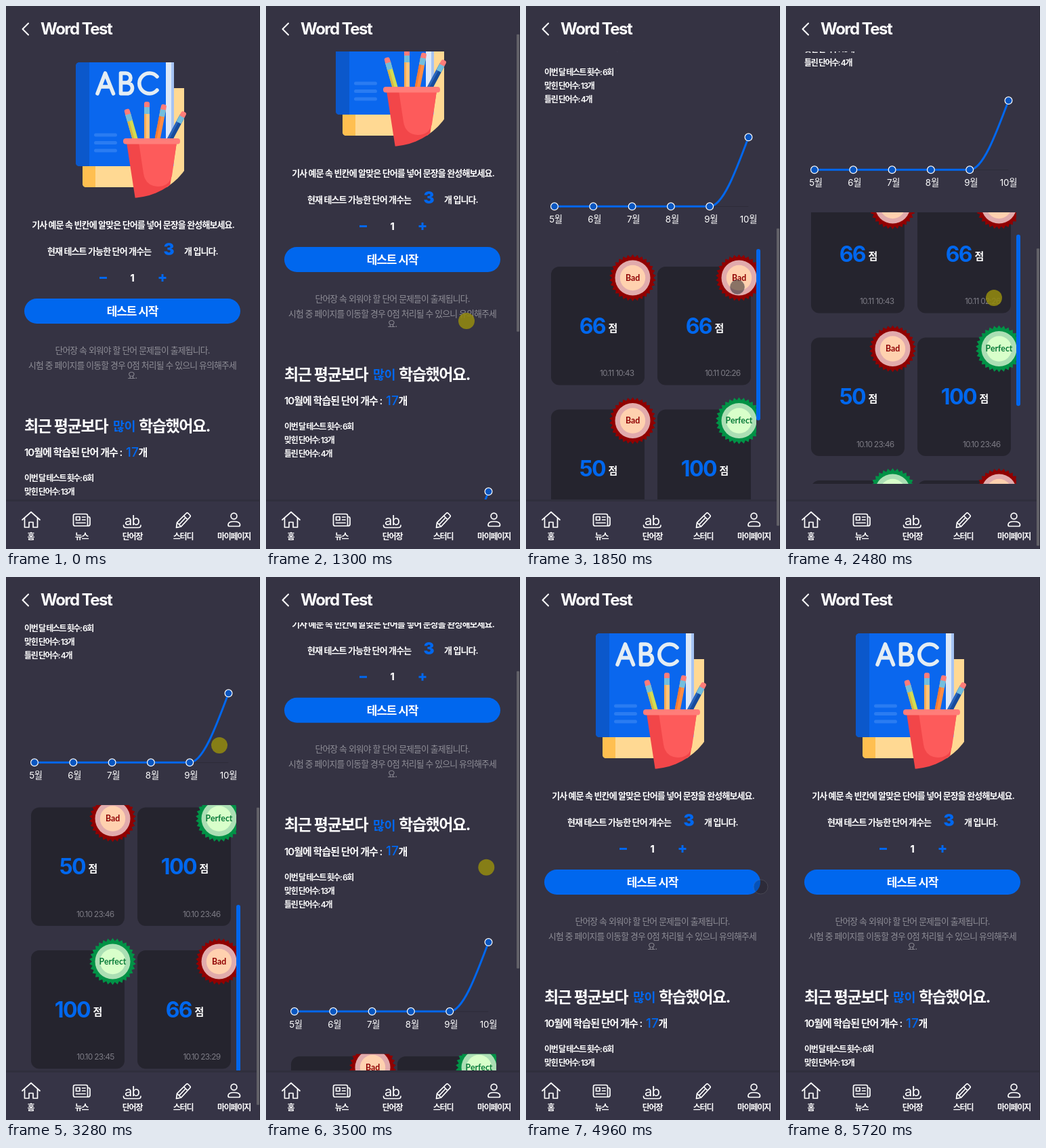
Animation of 375 by 800 pixels, one loop 6050 ms. Source, as an HTML page:

```html
<!DOCTYPE html>
<html lang="ko">
<head>
<meta charset="utf-8">
<style>
  html, body { margin: 0; width: 100%; height: 100%; overflow: hidden; background: #353343; }
  svg { display: block; width: 375px; height: 800px; font-family: Inter, "Noto Sans CJK KR", "Noto Sans CJK", sans-serif; }
</style>
</head>
<body>
<script>
const LOOP = 6050;
const BG = '#353343', BLUE = '#0067ee', GRAY = '#8f8e97';

// --- drawing helpers ---
const rect = (x, y, w, h, fill, rx = 0, extra = '') =>
  `<rect x="${x}" y="${y}" width="${w}" height="${h}" rx="${rx}" fill="${fill}" ${extra}/>`;
const circle = (x, y, r, fill, extra = '') =>
  `<circle cx="${x}" cy="${y}" r="${r}" fill="${fill}" ${extra}/>`;
const path = (d, fill) => `<path d="${d}" fill="${fill}"/>`;
const line = (d, stroke, width) =>
  `<path d="${d}" fill="none" stroke="${stroke}" stroke-width="${width}" stroke-linecap="round" stroke-linejoin="round"/>`;
// y is the middle of the glyphs
const text = (x, y, size, str, spacing = 0, { fill = '#fff', weight = 600, anchor = 'start', font = '' } = {}) =>
  `<text x="${x}" y="${y + size * .37}" font-size="${size}" font-weight="${weight}" fill="${fill}"
    text-anchor="${anchor}" letter-spacing="${spacing}" ${font && `font-family="${font}"`}>${str}</text>`;
const middle = { anchor: 'middle' };

// --- page parts ---
function pencil(x, y, angle, color, shade) {
  return `<g transform="translate(${x} ${y}) rotate(${angle})">
    ${rect(-4, 6, 8, 54, color)}${rect(-4, 6, 3, 54, shade)}
    ${rect(-4, 0, 8, 12, '#ff7d79', 3)}${rect(-4, 8, 8, 10, '#72bedd')}</g>`;
}

function illustration() {
  return `<g clip-path="url(#imageClip)">
    ${path('M119 121H263V267H119Q113 267 113 261V127Q113 121 119 121Z', '#ffd993')}
    ${path('M119 121H132V267H119Q113 267 113 261V127Q113 121 119 121Z', '#ffbf50')}
    ${rect(230, 83, 18, 153, '#dce8f8', 1)}${rect(244, 83, 4, 153, '#a5c3f3')}
    ${path('M109 83H236V236H109Q103 236 103 230V89Q103 83 109 83Z', '#0a67ee')}
    ${path('M109 83H123V236H109Q103 236 103 230V89Q103 83 109 83Z', '#0b58cb')}
    ${line('M135 129L146.500 99L158.500 129M139 119H154.500M169.500 99V129H178.500A8 8 0 0 0 178.500 113H169.500H177A7 7 0 0 0 177 99ZM223 104A15 15 0 1 0 223 124', '#e4edf3', 5.6)}
    ${line('M132.500 190H161.500M132.500 201.500H161.500M132.500 213H161.500', '#2a7cf2', 5)}
    ${pencil(178, 152, -16, '#d3dc52', '#d8b544')}
    ${pencil(208, 141, 0, '#ffc57c', '#f5ad58')}
    ${pencil(233.5, 145, 11, '#ff8d45', '#f47a35')}
    ${pencil(263.5, 156, 28, '#174c9c', '#2a66bd')}
    ${path('M178 201H252L239 285H191Z', '#f24649')}
    ${path('M196 201H252L245 250Q241 266 224 266Q206 265 203 247Z', '#fd5b5b')}
    ${rect(173, 195, 84, 8.5, '#ff7d79', 4)}
  </g>`;
}

function intro() {
  const muted = { fill: GRAY, weight: 400, anchor: 'middle' };
  return text(187.5, 322, 13, '기사 예문 속 빈칸에 알맞은 단어를 넣어 문장을 완성해보세요.', -.9, middle)
    + text(61, 361, 13, '현재 테스트 가능한 단어 개수는', -.9)
    + text(240.5, 358, 24, '3', 0, { fill: BLUE, weight: 900, anchor: 'middle' })
    + text(263, 361, 13, '개 입니다.', -.9)
    + path('M138 399h11v3h-11zM225.500 399h11v3h-11zM229.500 395h3v11h-3z', BLUE)
    + text(186.5, 400.5, 14, '1', 0, { weight: 800, anchor: 'middle' })
    + rect(27, 431, 319, 37, BLUE, 18.5)
    + text(186.5, 450, 17, '테스트 시작', -1.15, { weight: 700, anchor: 'middle' })
    + text(186.5, 507, 12.8, '단어장 속 외워야 할 단어 문제들이 출제됩니다.', -.8, muted)
    + text(186.5, 529, 12.8, '시험 중 페이지를 이동할 경우 0점 처리될 수 있으니 유의해주세', -.8, muted)
    + text(186.5, 544, 12.8, '요.', -.8, muted);
}

function summary() {
  return text(27, 618, 23, '최근 평균보다', -1.3, { weight: 700 })
    + text(158, 619, 18.5, '많이', -.5, { fill: BLUE })
    + text(196, 618, 23, '학습했어요.', -1.4, { weight: 700 })
    + text(27, 657.5, 15, '10월에 학습된 단어 개수 :', -1)
    + text(177, 656.5, 19, '17', 0, { fill: BLUE, weight: 500 })
    + text(195.5, 657.5, 15, '개')
    + ['이번 달 테스트 횟수: 6회', '맞힌 단어수: 13개', '틀린 단어수: 4개']
      .map((s, i) => text(27, 695.5 + i * 20, 12, s, -1.4)).join('');
}

function chart() {
  const xs = [0, 1, 2, 3, 4, 5].map(i => 42 + i * 57.3);
  return line('M42 893.500H328', '#2d2c39', 1)
    + line('M42 893.300H271.200C290.300 893.300 309.400 842.500 328.500 791.300', BLUE, 3)
    + xs.map((x, i) => circle(x, i < 5 ? 893.3 : 791.3, 5.4, '#0856c0', 'stroke="#fff" stroke-width="1.2"')
      + text(i < 5 ? x + 2 : x, 912, 13.3, `${i + 5}월`, -.2, { weight: 400, anchor: 'middle' })).join('');
}

function badge(x, y, perfect) {
  const [dark, ring, core] = perfect ? ['#009246', '#abdfb4', '#d8ffca'] : ['#900000', '#e1abac', '#ffd1af'];
  const teeth = Array.from({ length: 60 }, (_, i) => {
    const a = i * Math.PI / 30, r = i % 2 ? 30.5 : 34.5;
    return `${(x + r * Math.sin(a)).toFixed(1)},${(y - r * Math.cos(a)).toFixed(1)}`;
  });
  return `<polygon points="${teeth.join(' ')}" fill="${dark}"/>`
    + circle(x, y, 26, ring) + circle(x, y, 18.7, core)
    + text(x, y - .5, 12.3, perfect ? 'Perfect' : 'Bad', 0,
      { fill: perfect ? '#087a38' : dark, weight: 700, anchor: 'middle', font: 'Lato, sans-serif' });
}

function card(score, date, i) {
  const x = i % 2 ? 194 : 37, y = 982 + Math.floor(i / 2) * 210.5;
  const label = `<tspan fill="${BLUE}" font-size="32" font-weight="700" letter-spacing="-1.6">${score}</tspan>`
    + `<tspan dx="4.5" dy="-3" font-size="15">점</tspan>`;
  return rect(x, y, 138, 174.5, '#25242e', 12)
    + text(x + 70, y + 87, 32, label, 0, middle)
    + text(x + 122.5, y + 157, 12, date, -.75, { fill: '#7c7b84', weight: 400, anchor: 'end' })
    + badge(x + 120.5, y + 16.5, score === 100);
}

function records() {
  const items = [[66, '10.11 10:43'], [66, '10.11 02:26'], [50, '10.10 23:46'],
    [100, '10.10 23:46'], [100, '10.10 23:45'], [66, '10.10 23:29']];
  return `<g clip-path="url(#listClip)"><g id="list">${items.map(([s, d], i) => card(s, d, i)).join('')}</g></g>`
    + rect(340, 956, 6, 252.5, BLUE, 3, 'id="listThumb"');
}

function header() {
  return rect(0, 0, 375, 67, BG) + line('M33 25.500L24.500 34L33 42.500', '#fff', 2)
    + text(51, 33.3, 24, 'Word Test', -1.55, { weight: 700 });
}

function nav() {
  const icons = 'M24 757L37 745.500L50 757M27.500 754.500V768H34V760.500H40V768H46.500V754.500'
    + 'M102 748.500H118Q120.500 748.500 120.500 751V766H102Q99.500 766 99.500 763.500V751Q99.500 748.500 102 748.500Z'
    + 'M120.500 752.500H121.500Q124 752.500 124 755V763.500Q124 766 121 766M103.500 752.500H109V757.500H103.500ZM112.500 753H117M112.500 757H117M103.500 761.500H117'
    + 'M173.500 765Q173.500 768.500 177 768.500H195.500Q199 768.500 199 765'
    + 'M251.500 768.500L252.500 761L266 747.500Q267.500 746 269 747.500L271.500 750Q273 751.500 271.500 753L258.500 767ZM262.500 751L268 756.500M252.500 761L258.500 767M256 763.500L265 754'
    + 'M328 764.500C328 760.500 332 759.500 336.500 759.500S345.500 760.500 345.500 764.500Q345.500 766.500 343.500 766.500H330Q328 766.500 328 764.500Z';
  return rect(0, 727, 375, 3, '#302f3d') + rect(0, 730, 375, 70, '#363446')
    + line(icons, '#fff', 1.7)
    + circle(336.5, 751.5, 4.4, 'none', 'stroke="#fff" stroke-width="1.7"')
    + text(186.2, 757.5, 20, 'ab', -.5, { weight: 400, anchor: 'middle' })
    + ['홈', '뉴스', '단어장', '스터디', '마이페이지']
      .map((s, i) => text(36.5 + i * 75, 781.5, 12, s, -1.25, middle)).join('');
}

document.body.innerHTML = `<svg viewBox="0 0 375 800">
  <clipPath id="imageClip"><path d="M80 70H283V183A100 100 0 0 1 183 283H80Z"/></clipPath>
  <clipPath id="listClip"><rect x="0" y="956" width="340" height="400"/></clipPath>
  ${rect(0, 0, 375, 800, BG)}
  <g id="page">${illustration()}${intro()}${summary()}${chart()}${records()}</g>
  ${header()}${nav()}
  ${rect(374, 0, 1, 800, '#2b2a37')}
  ${rect(370, 0, 4, 438, '#626168', 1, 'id="pageThumb"')}
  ${circle(0, 0, 11, 'none', 'id="pointer"')}
</svg>`;

// --- motion: [time, value...] ---
const bursts = [[680, 1230, 8], [1300, 1850, 9], [1920, 2480, 9], [2540, 3080, 8], [3280, 3780, 8]];
const pageKeys = [[1160, 0], [1230, 18], [1300, 76], [1370, 165], [1440, 270], [1580, 450], [1710, 545],
  [1850, 598], [2000, 632], [2200, 652], [3080, 652], [3280, 620], [3350, 520], [3420, 390],
  [3490, 260], [3560, 150], [3640, 70], [3710, 22], [3780, 0]];
const listKeys = [[2340, 0], [2480, 52], [2620, 150], [2760, 210], [2900, 233]];
const pointerKeys = [[680, 366, 600], [1160, 298, 540], [1230, 297, 522], [1300, 296, 464], [1440, 300, 300],
  [1580, 304, 240], [1850, 312, 414], [2200, 308, 490], [2340, 307, 482], [2480, 307, 430], [2620, 306, 300],
  [2760, 308, 165], [2830, 308, 151], [3080, 313, 212], [3280, 315, 248], [3420, 320, 380],
  [3560, 330, 470], [3780, 346.5, 456.5]];
const presses = [[1160, 1560], [2340, 2700], [3210, 3500]];

// The screen refreshes in short bursts of even steps
function snap(t) {
  let held = 0;
  for (const [start, end, count] of bursts) {
    if (t < start) break;
    const step = (end - start) / (count - 1);
    held = start + step * Math.min(count - 1, Math.floor((t - start) / step + .01));
  }
  return held;
}

function sample(keys, t) {
  const i = keys.findIndex(k => k[0] > t);
  if (i < 0) return keys[keys.length - 1].slice(1);
  if (i === 0) return keys[0].slice(1);
  const a = keys[i - 1], b = keys[i], f = (t - a[0]) / (b[0] - a[0]);
  return a.slice(1).map((v, j) => v + (b[j + 1] - v) * f);
}

const set = (id, attrs) => {
  for (const name in attrs) document.getElementById(id).setAttribute(name, attrs[name]);
};

function draw(t) {
  const held = snap(t);
  const [scroll] = sample(pageKeys, held), [listScroll] = sample(listKeys, held);
  const [x, y] = sample(pointerKeys, held);
  const pressed = presses.some(([a, b]) => held >= a && held < b);

  set('page', { transform: `translate(0 ${-scroll})` });
  set('list', { transform: `translate(0 ${-listScroll})` });
  set('listThumb', { y: 956 + listScroll * .631 });
  set('pageThumb', {
    y: scroll * .548,
    opacity: held <= 1160 || t >= 4310 ? 0 : t >= 4170 ? .5 : 1
  });
  set('pointer', {
    cx: x, cy: y, r: pressed ? 12 : 10.5,
    fill: pressed ? 'rgba(146,137,16,.88)' : 'rgba(22,22,28,.5)',
    stroke: pressed ? 'none' : 'rgba(120,120,124,.6)',
    opacity: t < 680 || t >= 5030 ? 0 : t >= 4960 ? .5 : 1
  });
}

const began = performance.now();
function tick() {
  draw((performance.now() - began) % LOOP);
  requestAnimationFrame(tick);
}
tick();
</script>
</body>
</html>
```
